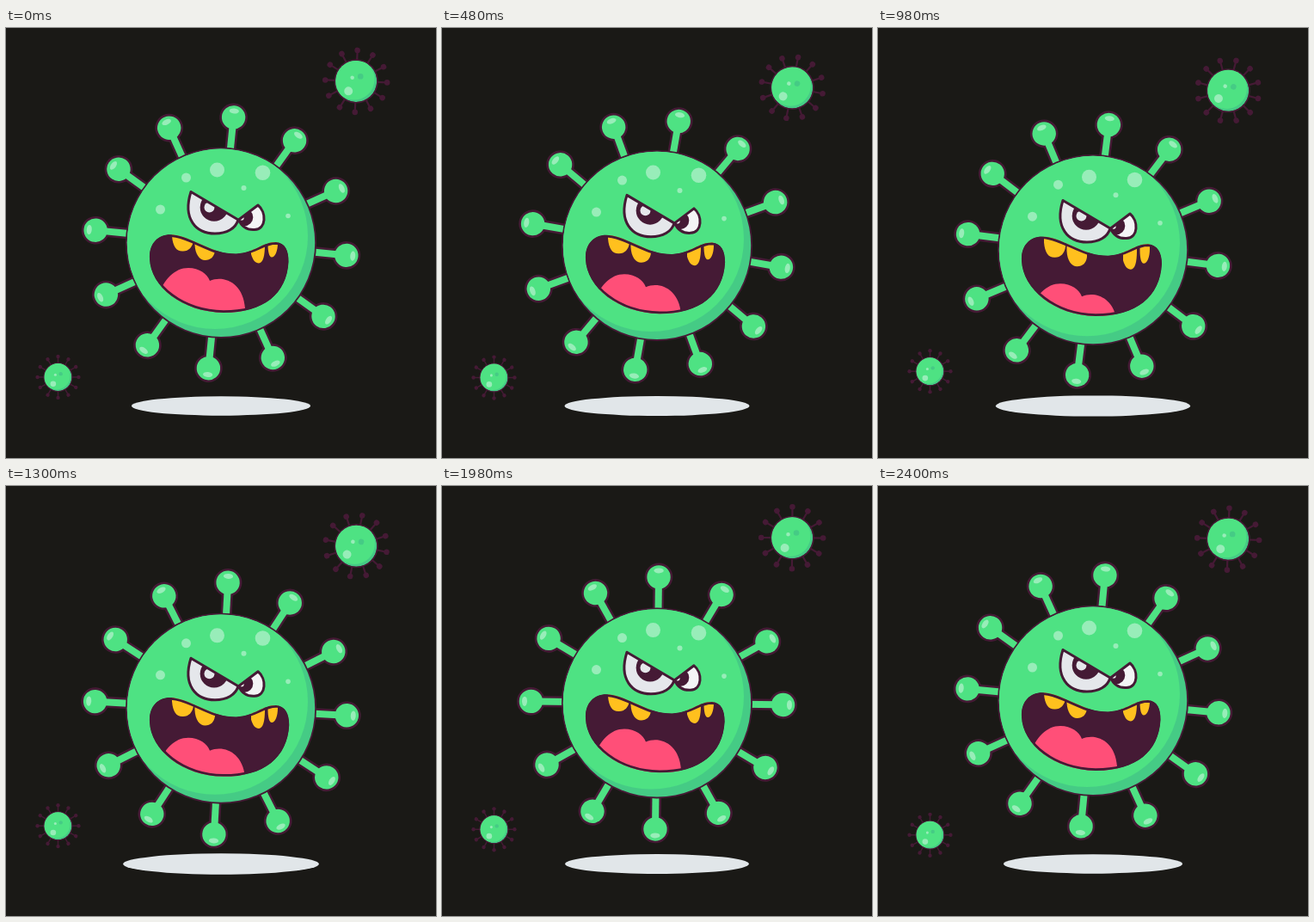
An HTML page that plays this animation: 500x500 px, repeating every 2420 ms.

```html
<!DOCTYPE html>
<html lang="en">
<head>
<meta charset="utf-8">
<title>Angry virus</title>
<style>
html, body { margin: 0; width: 100%; height: 100%; overflow: hidden; background: #1a1916; }
svg { display: block; width: 100%; height: 100%; }
</style>
</head>
<body>
<svg viewBox="0 0 500 500">
  <defs>
    <clipPath id="bodyClip"><circle cx="250" cy="249.8" r="109.2"/></clipPath>
    <clipPath id="mouthClip"><path id="mouthEdge"/></clipPath>
    <clipPath id="eyeL"><path d="M215 190.500L270 223C267 233 257 239 243 239C221 239 205 222 215 190.500Z"/></clipPath>
    <clipPath id="eyeR"><path d="M270.500 223L293 206C303 214 303 234 289 234.500C281 235 274 231 270.500 223Z"/></clipPath>
    <clipPath id="ballClip"><circle r="24"/></clipPath>
    <g id="spike">
      <path d="M0 -100V-140" stroke="#451a35" stroke-width="13"/>
      <circle cy="-146.600" r="16.300" fill="#451a35"/>
      <path d="M0 -100V-140" stroke="#4ee283" stroke-width="8"/>
      <circle cy="-146.600" r="13.700" fill="#4ee283"/>
      <ellipse cy="-154" rx="5.600" ry="3" fill="#98edb9"/>
    </g>
    <g id="pin">
      <path d="M0 -23V-36" stroke="#451a35" stroke-width="2.200"/>
      <circle cy="-36" r="3.300" fill="#451a35"/>
    </g>
    <g id="mini">
      <g id="pins"></g>
      <circle r="25.600" fill="#451a35"/>
      <g clip-path="url(#ballClip)">
        <circle r="24" fill="#45cb85"/>
        <circle cx="-2.500" cy="-2" r="23.800" fill="#4ee283"/>
      </g>
      <circle cx="-8.500" cy="11.800" r="5" fill="#98edb9"/>
      <circle cx="-4.700" cy="-4" r="2.300" fill="#98edb9"/>
      <circle cx="4.800" cy="-5.800" r="3.300" fill="#45cb85"/>
    </g>
  </defs>

  <ellipse id="shadow" cx="250" cy="439.500" fill="#e1e6e9"/>
  <use id="miniA" href="#mini"/>
  <use id="miniB" href="#mini"/>

  <g id="hero">
    <g id="spikes"></g>
    <circle cx="250" cy="249.800" r="111" fill="#451a35"/>
    <g clip-path="url(#bodyClip)">
      <circle cx="250" cy="249.800" r="110" fill="#45cb85"/>
      <circle cx="243" cy="242" r="108" fill="#4ee283"/>
    </g>
    <g id="spots" fill="#98edb9"></g>

    <g id="mouth" clip-path="url(#mouthClip)">
      <path id="mouthFill" fill="#451a35"/>
      <path id="tongue" fill="#ff4f78" d="M176 312C184 292 196 279 212 279C225 279 234 286 237 294C253 287 276 296 278 326V350H176Z"/>
      <path id="teeth" fill="#ffc01e" d="M193 228V242C194 254 198 259.500 205 259.500C212 260 217 255 218 247V228Z
        M219.500 234V252C220 263 225 270 231.500 270C238 270 242 266 243 259V234Z
        M285 250V263C287 270 290 273.500 294 273.500C299 273 301 265 301 252V238Z
        M304.500 238V251C304.500 260 306 266.500 309 266.500C313 266.500 316 259 316 250V238Z"/>
      <path id="lip" fill="none" stroke="#451a35" stroke-width="5.500"/>
    </g>

    <g id="eyes" stroke-linejoin="round">
      <g clip-path="url(#eyeL)">
        <rect x="200" y="180" width="80" height="70" fill="#e5e7eb"/>
        <circle cx="242" cy="208.500" r="16.300" fill="#451a35"/>
        <circle cx="236.500" cy="208.500" r="6" fill="#e5e7eb"/>
      </g>
      <g clip-path="url(#eyeR)">
        <rect x="260" y="195" width="50" height="50" fill="#f4f4f6"/>
        <circle cx="277" cy="220" r="10.300" fill="#451a35"/>
        <circle cx="274" cy="221" r="2.600" fill="#f4f4f6"/>
      </g>
      <path d="M215 190.500L270 223C267 233 257 239 243 239C221 239 205 222 215 190.500ZM270.500 223L293 206C303 214 303 234 289 234.500C281 235 274 231 270.500 223Z" fill="none" stroke="#451a35" stroke-width="3"/>
    </g>
  </g>
</svg>
<script>
const LOOP = 2420, TAU = Math.PI * 2, RAD = Math.PI / 180;
const el = id => document.getElementById(id);
const move = (id, value) => el(id).setAttribute('transform', value);

const ring = (part, center) => Array.from({ length: 12 }, (_, i) =>
  `<use href="#${part}" transform="${center} rotate(${i * 30})"/>`).join('');
el('spikes').innerHTML = ring('spike', 'translate(250 249.8)');
el('pins').innerHTML = ring('pin', '');

el('spots').innerHTML = [
  [245.5, 165, 8.5], [298.5, 168.2, 8.8], [209.5, 174, 5.5],
  [276.5, 186, 3], [179.5, 211, 5.5], [328, 218.5, 2.8]
].map(([x, y, r]) => `<circle cx="${x}" cy="${y}" r="${r}"/>`).join('');

// How far the jaw has closed: time in ms, amount
const jaw = [[0, 0], [480, .42], [980, 1], [1300, .5], [1680, .33], [1980, .1], [LOOP, 0]];
const slopes = jaw.map((p, i) => {
  const a = jaw[i - 1], b = jaw[i + 1];
  if (!a || !b) return 0;
  const l = (p[1] - a[1]) / (p[0] - a[0]), r = (b[1] - p[1]) / (b[0] - p[0]);
  return l * r > 0 ? 2 * l * r / (l + r) : 0;
});

function jawAt(t) {
  let i = 0;
  while (i < jaw.length - 2 && t >= jaw[i + 1][0]) i++;
  const [t0, a] = jaw[i], [t1, b] = jaw[i + 1];
  const h = t1 - t0, u = (t - t0) / h, v = 1 - u;
  return v * v * (1 + 2 * u) * a + u * v * v * h * slopes[i]
    + u * u * (3 - 2 * u) * b - u * u * v * h * slopes[i + 1];
}

function mouthPath(k) {
  const top = -6 * k, right = 328.5 + 1.5 * k, low = 331 - 4.2 * k;
  const y = n => n + top;
  return `M167 ${y(268)}C166 ${y(248)} 180 ${y(237)} 198 ${y(241)}
    C222 ${y(246)} 240 ${y(263)} 268 ${y(262.5)}
    C290 ${y(261)} 298 ${y(249)} 314 ${y(249)}
    C325 ${y(250)} ${right} ${y(259)} ${right} ${y(272)}
    C${right - 2} ${low - 22} 300 ${low} 253 ${low}
    C205 ${low - 1} 168 ${y(301)} 167 ${y(268)}Z`;
}

function draw(ms) {
  const t = ms % LOOP, phase = t / LOOP * TAU;
  const drop = (1 - Math.cos(phase)) / 2, k = jawAt(t);

  move('hero', `translate(0 ${9 * drop})`);
  move('spikes', `rotate(${5 + 5 * Math.sin(phase + 8 * RAD)} 250 249.8)`);
  el('shadow').setAttribute('rx', 104 + 10 * drop);
  el('shadow').setAttribute('ry', 11.2 + drop);

  const path = mouthPath(k);
  for (const id of ['mouthEdge', 'mouthFill', 'lip']) el(id).setAttribute('d', path);
  move('tongue', `translate(0 ${10 * k})`);
  move('teeth', `translate(0 ${-k})`);
  move('eyes', `translate(0 ${1.8 * k})`);

  const a = Math.cos(phase - 134 * RAD), b = Math.cos(phase - 40 * RAD);
  move('miniA', `translate(407.2 ${66.4 + 6.5 * a}) rotate(${7.5 + 7.5 * a})`);
  move('miniB', `translate(60.5 ${401 + 6.5 * b}) scale(.665)`);
}

const start = performance.now();
function tick() {
  draw(performance.now() - start);
  requestAnimationFrame(tick);
}
draw(0);
requestAnimationFrame(tick);
</script>
</body>
</html>
```
